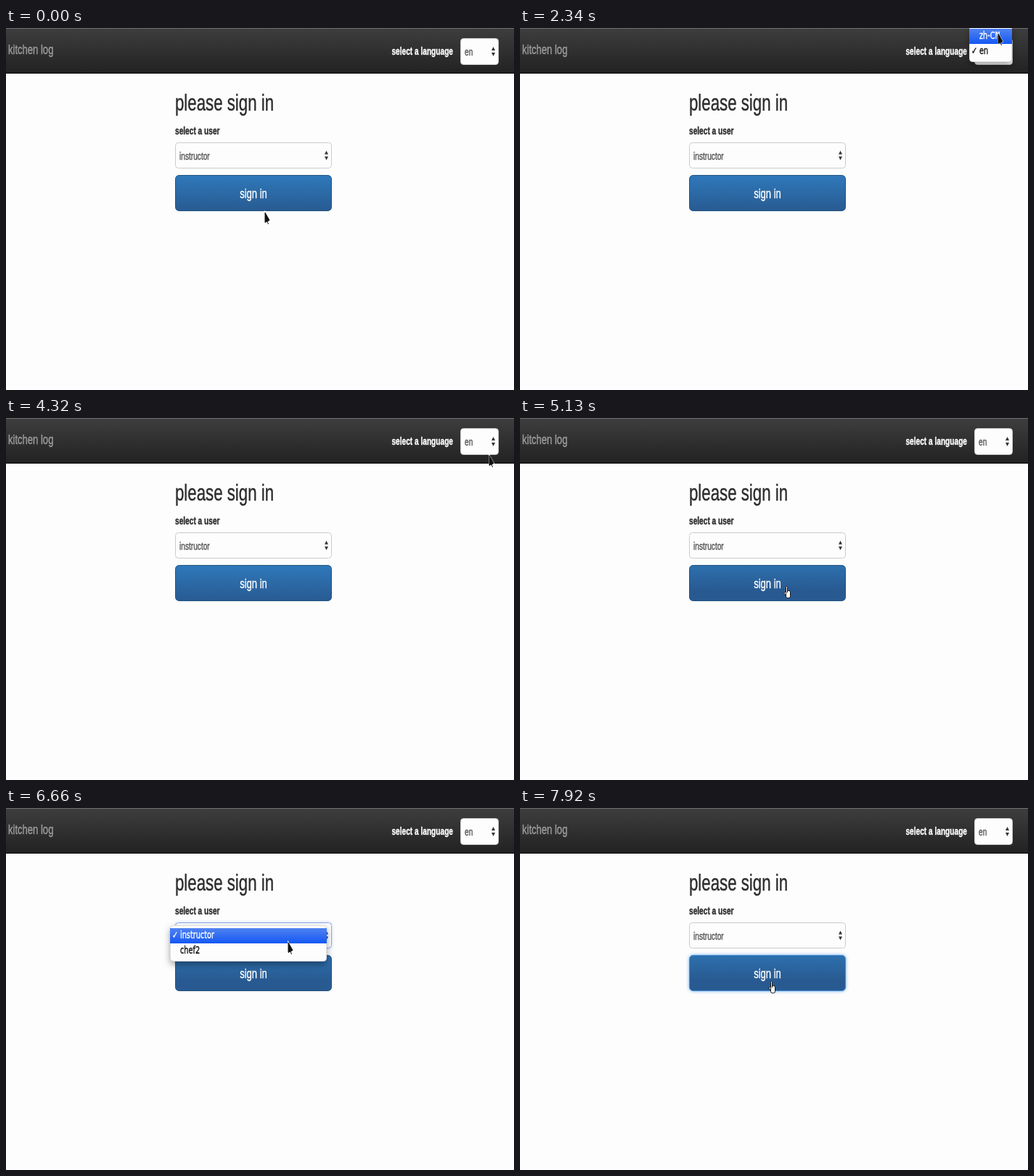
These frames come from a looping animation (700 by 500 pixels, 8000 ms). An HTML page with a canvas:

```html
<!DOCTYPE html>
<html lang="en">
<head>
<meta charset="utf-8">
<title>Sign in</title>
<style>
  html, body { margin: 0; width: 100%; height: 100%; overflow: hidden; background: #fdfdfd; }
  canvas { display: block; width: 100vw; height: 100vh; }
</style>
</head>
<body>
<canvas id="stage" width="700" height="500"></canvas>
<script>
const ctx = document.getElementById('stage').getContext('2d');
const LOOP = 8000, STEP = 90;
const SQUEEZE = 0.725; // the whole page is shown narrower than it was laid out
const SANS = '"Liberation Sans", "Noto Sans CJK SC", "Noto Sans CJK", sans-serif';
const MENU_FONT = '13.4px "DejaVu Sans", sans-serif';
const PAPER = '#fdfdfd', INK = '#2c2c2c', ROW = 21;

const WORDS = {
  en: { brand: 'kitchen log', language: 'select a language', heading: 'please sign in', user: 'select a user', button: 'sign in' },
  'zh-CN': { brand: '厨房日志', language: '选择语言', heading: '请登录', user: '选择一个用户', button: '登录' }
};
const USERS = ['instructor', 'chef2'];
const LANGUAGES = ['zh-CN', 'en'];

// Where the pointer rests, and when it gets there
const STOPS = [
  { at: 0, x: 357, y: 255 },
  { at: 1260, x: 665, y: 41 },
  { at: 2160, x: 659, y: 8 },
  { at: 3060, x: 666, y: 38 },
  { at: 3870, x: 666, y: 52 },
  { at: 5040, x: 366, y: 232 },
  { at: 5850, x: 389, y: 186 },
  { at: 7650, x: 345, y: 239 }
];
const CLICK = { openLanguages: 1620, pickChinese: 2520, reopenLanguages: 3240, pickEnglish: 4050,
  openUsers: 6120, pickUser: 7020, signIn: 7740 };

const within = (v, from, to) => v >= from && v < to;

// Longer ways take longer, and each move ends at its stop's time
function pointerAt(t) {
  let { x, y } = STOPS[0];
  for (const stop of STOPS.slice(1)) {
    const dx = stop.x - x, dy = stop.y - y;
    const travel = 250 + 1.2 * Math.hypot(dx, dy);
    const u = Math.min(1, Math.max(0, 1 - (stop.at - t) / travel));
    const eased = u * u * (3 - 2 * u);
    x += dx * eased;
    y += dy * eased;
    if (u < 1) break;
  }
  return { x, y };
}

function gradient(top, bottom, from, to) {
  const g = ctx.createLinearGradient(0, top, 0, bottom);
  g.addColorStop(0, from);
  g.addColorStop(1, to);
  return g;
}

function rect(x, y, w, h, fill) {
  ctx.fillStyle = fill;
  ctx.fillRect(x, y, w, h);
}

function text(str, x, y, font, color, align = 'left') {
  ctx.save();
  ctx.translate(x, y);
  ctx.scale(SQUEEZE, 1);
  ctx.font = font;
  ctx.fillStyle = ctx.strokeStyle = color;
  ctx.lineWidth = 0.4;
  ctx.textAlign = align;
  ctx.fillText(str, 0, 0);
  ctx.strokeText(str, 0, 0);
  ctx.restore();
}

function box(x, y, w, h, radius, fill, border, glow, blur = 5, drop = 0) {
  ctx.save();
  ctx.beginPath();
  ctx.roundRect(x + 0.5, y + 0.5, w - 1, h - 1, radius);
  ctx.shadowColor = glow || 'transparent';
  ctx.shadowBlur = blur;
  ctx.shadowOffsetY = drop;
  ctx.fillStyle = fill;
  ctx.fill();
  ctx.shadowColor = 'transparent';
  ctx.strokeStyle = border;
  ctx.stroke();
  ctx.restore();
}

function triangle(x, y, halfWidth, height) {
  ctx.beginPath();
  ctx.moveTo(x - halfWidth, y);
  ctx.lineTo(x, y + height);
  ctx.lineTo(x + halfWidth, y);
  ctx.fillStyle = '#333';
  ctx.fill();
}

function select(x, y, w, h, value, focused) {
  const middle = y + h / 2;
  box(x, y, w, h, 4, PAPER, focused ? '#8fa6f0' : '#ccc', focused && 'rgba(102,150,233,.35)');
  text(value, x + 6, middle + 5.5, '14px ' + SANS, '#555');
  for (const side of [-1, 1]) triangle(x + w - 7.5, middle + side * 1.5, 2.5, side * 5);
}

function menu(x, y, w, items, checked, pointerY) {
  const height = items.length * ROW + 8;
  const active = Math.floor((pointerY - y) / ROW);
  box(x, y - 4, w, height, 4, PAPER, '#ddd', 'rgba(0,0,0,.4)', 10, 4);
  items.forEach((item, i) => {
    const top = y + i * ROW, color = i === active ? '#fff' : '#111';
    if (i === active) rect(x, top, w, ROW, gradient(top, top + ROW, '#5082f0', '#1458f4'));
    if (i === checked) text('✓', x + 3, top + 14, MENU_FONT, color);
    text(item, x + 14, top + 14, MENU_FONT, color);
  });
}

function navbar(words) {
  rect(0, 0, 700, 63, gradient(0, 62, '#3e3e3e', '#222'));
  rect(0, 0, 700, 1, '#707070');
  rect(0, 62, 700, 1, '#080808');
  text(words.brand, 3, 36, '18px ' + SANS, '#9d9d9d');
  text(words.language, 616, 37, 'bold 14px ' + SANS, '#fff', 'right');
}

function button(label, hover, focused) {
  const top = hover ? 188 : 203; // hovering slides the gradient up
  box(233, 203, 216, 50, 5, gradient(top, top + 50, '#2f79bb', '#285a91'),
    focused ? '#4a8fd8' : '#245580', focused && 'rgba(70,150,235,.9)');
  text(label, 341, 235, '18px ' + SANS, '#fff', 'center');
}

function arrow(x, y) {
  ctx.beginPath();
  ctx.moveTo(x, y);
  ctx.lineTo(x, y + 13.5);
  ctx.lineTo(x + 6, y + 10.5);
  ctx.closePath();
  ctx.moveTo(x + 2, y + 9);
  ctx.lineTo(x + 4.5, y + 16);
  ctx.lineWidth = 2;
  ctx.strokeStyle = 'rgba(255,255,255,.8)';
  ctx.stroke();
  ctx.lineWidth = 1;
  ctx.strokeStyle = ctx.fillStyle = '#111';
  ctx.stroke();
  ctx.fill();
}

function hand(x, y) {
  box(x - 2, y + 7, 5, 6, 2, '#fff', '#111');
  box(x, y + 6, 7, 11, 2, '#fff', '#111');
  box(x, y, 3, 12, 1, '#fff', '#111');
  rect(x + 1, y + 9, 4, 5, '#fff');
}

function draw(t) {
  const language = within(t, CLICK.pickChinese, CLICK.pickEnglish) ? 'zh-CN' : 'en';
  const words = WORDS[language];
  const { x, y } = pointerAt(t);
  const onButton = within(x, 233, 449) && within(y, 203, 253);
  const usersOpen = within(t, CLICK.openUsers, CLICK.pickUser);

  ctx.lineWidth = 1;
  rect(0, 0, 700, 500, PAPER);
  navbar(words);
  select(626, 14, 53, 37, language);
  text(words.heading, 233, 114, '500 30.7px ' + SANS, INK);
  text(words.user, 233, 147, 'bold 14px ' + SANS, INK);
  select(233, 158, 216, 36, USERS[0], within(t, CLICK.openUsers, CLICK.signIn));
  button(words.button, onButton || usersOpen, t >= CLICK.signIn);

  if (within(t, CLICK.openLanguages, CLICK.pickChinese)) menu(619, 1, 59, LANGUAGES, 1, y);
  if (within(t, CLICK.reopenLanguages, CLICK.pickEnglish)) menu(619, 22, 59, LANGUAGES, 0, y);
  if (usersOpen) menu(226, 166, 216, USERS, 0, y);

  (onButton ? hand : arrow)(x, y);
}

function frame(now) {
  draw(Math.floor((now % LOOP) / STEP) * STEP);
  requestAnimationFrame(frame);
}
requestAnimationFrame(frame);
</script>
</body>
</html>
```
